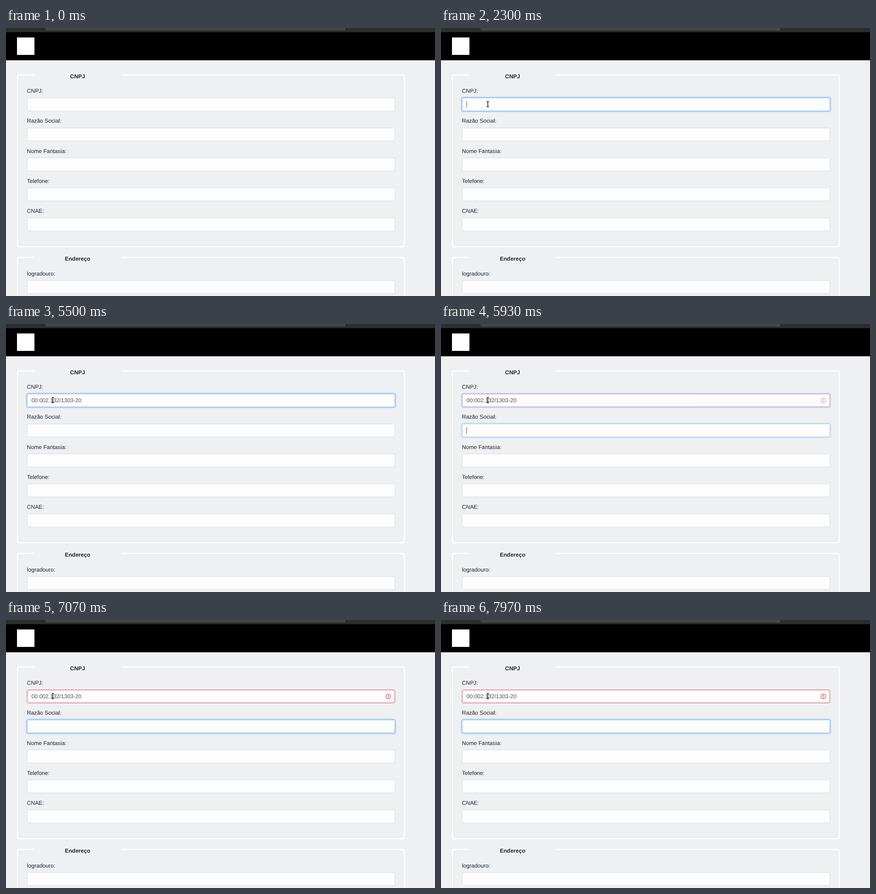
Animation of 860x538 px, one loop 8000 ms. Source, as an HTML page:

```html
<!DOCTYPE html>
<html lang="pt-BR">
<head>
<meta charset="utf-8">
<title>Cadastro</title>
<style>
  html, body { margin: 0; height: 100%; overflow: hidden; background: #eef0f2; }
  svg { display: block; width: 100vw; height: 100vh; }
  text { font: 11.2px "Liberation Sans", Arial, sans-serif; fill: #212529; text-rendering: geometricPrecision; }
  .legend { font-weight: bold; text-anchor: middle; }
  .value { fill: #495057; }
  .input { fill: #fdfdfd; stroke: #d3d7de; stroke-width: .8; }
  .frame { fill: none; stroke: #fff; stroke-width: 2.2; }
  .ring { fill: none; stroke: #b9d6f3; stroke-width: 2.3; }
  .focus { fill: none; stroke: #80bdff; stroke-width: .9; }
  .invalid { fill: none; stroke: #dc3545; stroke-width: .8; }
</style>
</head>
<body>
<svg id="stage" viewBox="0 0 860 538"></svg>
<script>
const DURATION = 8000;
const FIELD = { x: 42.4, y: 140.4, w: 737.2, h: 26, pitch: 60.2 };
const DIGITS = '00002132130320';
const KEY_TIMES = [3080, 3540, 3660, ...Array.from({ length: 11 }, (_, i) => 3970 + i * 120)];
const FOCUS_AT = 1900, TAB_AT = 5850, FADE = 150;

const box = (cls, y, grow = 0, radius = 2.8) =>
  `<rect class="${cls}" x="${FIELD.x - grow}" y="${y - grow}" width="${FIELD.w + 2 * grow}"
    height="${FIELD.h + 2 * grow}" rx="${radius + grow}"/>`;

const field = (label, y) =>
  `<text x="42" y="${y - 10.3}">${label}</text>${box('input', y)}`;

const fieldset = (legend, top, labels) => `
  <path class="frame" d="M56 ${top}H26q-3 0-3 3v339q0 3 3 3H795.5q3 0 3-3V${top + 3}q0-3-3-3H231"/>
  <text class="legend" x="143.5" y="${top + 6.5}">${legend}</text>
  ${labels.map((label, i) => field(label, top + 46.2 + i * FIELD.pitch)).join('')}`;

const focusRing = (id, y) =>
  `<g id="${id}">${box('ring', y, 1.5)}${box('focus', y)}</g>`;

const secondY = FIELD.y + FIELD.pitch;
document.getElementById('stage').innerHTML = `
  <rect width="860" height="538" fill="#eef0f2"/>
  <rect width="860" height="9" fill="#2b2d2e"/>
  <path d="M79 0H680V2q0 3-3 3H82q-3 0-3-3z" fill="#454748"/>
  <rect y="8.4" width="860" height="56.4" fill="#000"/>
  <rect x="22" y="19" width="35" height="35" fill="#fff"/>
  ${fieldset('CNPJ', 94.2, ['CNPJ:', 'Razão Social:', 'Nome Fantasia:', 'Telefone:', 'CNAE:'])}
  ${fieldset('Endereço', 460.7, ['logradouro:'])}
  ${focusRing('firstRing', FIELD.y)}
  ${focusRing('secondRing', secondY)}
  <g id="error">
    ${box('invalid', FIELD.y)}
    <circle cx="766.3" cy="153.2" r="4.7" fill="none" stroke="#dc3545" stroke-width="1.1"/>
    <path d="M766.3 150.3v3.6m0 1v1.4" stroke="#dc3545" stroke-width="1.4"/>
  </g>
  <text id="value" class="value" x="51.1" y="157.3"></text>
  <rect id="caret" width=".9" height="13" fill="#495057"/>
  <g id="beam" fill="none">
    <path d="M-2.5-5.5H2.5M0-5.5V5.5M-2.5 5.5H2.5" stroke="#d0d2d4" stroke-width="2.2"/>
    <path d="M-2.2-5.2H2.2M0-5.2V5.2M-2.2 5.2H2.2" stroke="#1c1c1c" stroke-width="1.2"/>
  </g>
  <path id="arrow" d="M0 0V11.2L2.5 8.9 4.3 13 6.2 12.2 4.4 8.2H7.8z"
    fill="#141414" stroke="#e8e8e8" stroke-width=".6"/>`;

const el = id => document.getElementById(id);
const [value, caret, beam, arrow, firstRing, secondRing, error] =
  ['value', 'caret', 'beam', 'arrow', 'firstRing', 'secondRing', 'error'].map(el);
const clamp = v => Math.min(1, Math.max(0, v));
const show = (node, on) => node.setAttribute('opacity', +on);
const place = (node, x, y) => node.setAttribute('transform', `translate(${x} ${y})`);

// CNPJ mask: 00.000.000/0000-00
function mask(digits) {
  const marks = { 2: '.', 5: '.', 8: '/', 12: '-' };
  return [...digits].map((d, i) => (marks[i] || '') + d).join('');
}

function pointerAt(t) {
  const p = clamp((t - 1100) / 630), k = 1 - (1 - p) ** 2;
  const bend = (a, b, c) => a * (1 - k) ** 2 + 2 * b * k * (1 - k) + c * k * k;
  return [bend(124, 76, 93.8), bend(536, 300, 152.7)];
}

function overInput(y) {
  const offset = (y > 450 ? y - 366.5 : y) - FIELD.y;
  return offset >= 0 && offset < 5 * FIELD.pitch && offset % FIELD.pitch < FIELD.h;
}

function draw(t) {
  const text = mask(DIGITS.slice(0, KEY_TIMES.filter(k => k <= t).length));
  if (value.textContent !== text) value.textContent = text;

  const tabbed = t >= TAB_AT;
  const first = clamp((t - FOCUS_AT) / FADE), second = clamp((t - TAB_AT) / FADE);
  show(firstRing, first * (1 - second));
  show(secondRing, second);
  show(error, second);

  show(caret, t >= FOCUS_AT && t < 5450 || tabbed && t < 6700);
  caret.setAttribute('x', 51.1 + (tabbed || !text ? 0 : value.getComputedTextLength()));
  caret.setAttribute('y', tabbed ? secondY + 6.6 : FIELD.y + 6.4);

  const [x, y] = pointerAt(t);
  const isArrow = !overInput(y) || t >= 3600 && t < 4400;
  show(arrow, t >= 1100 && isArrow);
  show(beam, t >= 1100 && !isArrow);
  place(arrow, x + 1.2, y - .5);
  place(beam, x, y);
}

function tick() {
  draw(performance.now() % DURATION);
  requestAnimationFrame(tick);
}
tick();
</script>
</body>
</html>
```
